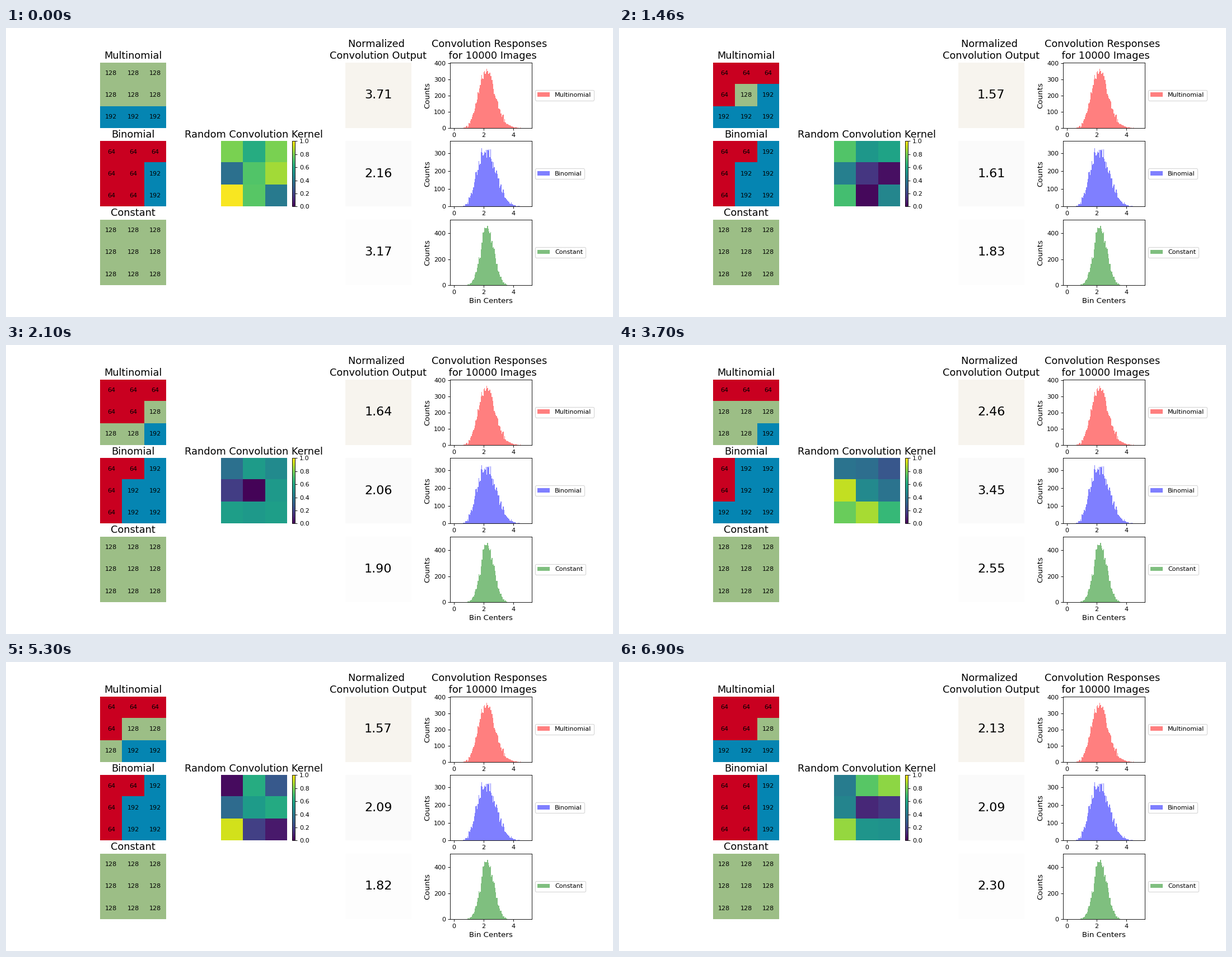
Animation, 1084 px wide and 517 px high, one loop 8000 ms. Source, as a matplotlib script:

```python
import numpy as np
import matplotlib.pyplot as plt
from matplotlib.animation import FuncAnimation
from matplotlib.colors import ListedColormap

W, H, DPI = 1084, 517, 80
GRID_H = 517.5                     # layout height behind the three rows
SIDE = GRID_H * 0.77 / 3.4         # panel side in pixels
NAMES = ["Multinomial", "Binomial", "Constant"]
LEVELS = np.array([64, 128, 192])
PIXEL_CMAP = ListedColormap(["#c90020", "#9cbe86", "#0585b2"])

# Per step: multinomial counts of 64 and 128, binomial count of 64, kernel
STEPS = [
    (0, 6, 7, [.80, .62, .80, .37, .73, .86, .99, .74, .41]),
    (4, 1, 4, [.73, .53, .58, .43, .16, .04, .70, .02, .46]),
    (5, 3, 4, [.37, .55, .48, .18, .01, .54, .56, .54, .56]),
    (3, 5, 2, [.38, .36, .27, .91, .47, .38, .77, .87, .67]),
    (4, 3, 4, [.03, .62, .28, .35, .55, .61, .93, .19, .07]),
    (5, 1, 6, [.42, .74, .83, .45, .11, .16, .84, .52, .51]),
]

fig = plt.figure(figsize=(W / DPI, H / DPI), dpi=DPI, facecolor="white")


def panel(x, row, width=SIDE):
    """Axes with the left edge at pixel x, in the given row."""
    bottom = GRID_H * 0.11 + (2 - row) * 1.2 * SIDE
    return fig.add_axes([x / W, bottom / H, width / W, SIDE / H])


def picture(x, row, data, **style):
    """Image without axes."""
    ax = panel(x, row)
    ax.axis("off")
    return ax, ax.imshow(data, interpolation="nearest", **style)


def title(ax, text):
    ax.set_title(text, fontsize=16)


def sorted_pixels(step):
    """Level index of each pixel for the three kinds of image."""
    low, mid, binom_low, _ = STEPS[step]
    return [np.repeat([0, 1, 2], [low, mid, 9 - low - mid]),
            np.repeat([0, 2], [binom_low, 9 - binom_low]),
            np.ones(9, int)]


# Input images
images, cell_texts = [], []
for row, name in enumerate(NAMES):
    ax, image = picture(168.4, row, np.ones((3, 3)),
                        cmap=PIXEL_CMAP, vmin=0, vmax=2)
    title(ax, name)
    images.append(image)
    cell_texts.append([ax.text(i % 3, i // 3, "", ha="center", va="center")
                       for i in range(9)])

# Kernel and its colour bar
ax, kernel_image = picture(384.2, 1, np.zeros((3, 3)),
                           cmap="viridis", vmin=0, vmax=1)
title(ax, "Random Convolution Kernel")
fig.colorbar(kernel_image, cax=panel(510.6, 1, SIDE / 20),
             ticks=np.linspace(0, 1, 6))

# Convolution outputs
out_texts = []
for row, rgb in enumerate([(247, 244, 238), (250, 250, 250), (253, 253, 253)]):
    ax, _ = picture(606.2, row, np.full((1, 1, 3), rgb, dtype=np.uint8))
    out_texts.append(ax.text(0, 0, "", fontsize=20, ha="center", va="center"))
    if row == 0:
        title(ax, "Normalized \nConvolution Output")

# Histograms of kernel responses over random images
rng = np.random.default_rng(1)
shape = (10000, 9)
weights = rng.random(shape)
samples = [rng.choice(LEVELS, shape), rng.choice(LEVELS[::2], shape),
           np.full(shape, LEVELS[1])]
styles = [("red", 406, 100), ("blue", 367, 100), ("green", 506, 200)]
for row, (color, top, tick) in enumerate(styles):
    ax = panel(793.05, row, 146.1)
    response = (weights * samples[row]).sum(axis=1) / 255
    ax.hist(response, bins=np.linspace(0, 5, 101), histtype="stepfilled",
            color=color, alpha=0.5, lw=0, label=NAMES[row])
    ax.set_xlim(-0.25, 5.25)
    ax.set_ylim(0, top)
    ax.set_xticks([0, 2, 4])
    ax.set_yticks(range(0, top, tick))
    ax.set_ylabel("Counts", fontsize=12)
    ax.legend(loc="center left", bbox_to_anchor=(1, 0.5))
    if row == 0:
        title(ax, "Convolution Responses \n for 10000 Images")
ax.set_xlabel("Bin Centers", fontsize=12)


def update(frame):
    step = (frame * 100 + 1100) // 1600
    kernel = np.array(STEPS[step][-1])
    kernel_image.set_data(kernel.reshape(3, 3))
    for row, pixels in enumerate(sorted_pixels(step)):
        response = kernel @ LEVELS[pixels] / 255
        out_texts[row].set_text(f"{response:.2f}")
        # The binomial image fills column by column
        grid = pixels.reshape(3, 3, order="F" if row == 1 else "C")
        images[row].set_data(grid)
        for text, level in zip(cell_texts[row], grid.flat):
            text.set_text(str(LEVELS[level]))
    return []


anim = FuncAnimation(fig, update, frames=80, interval=100,
                     repeat=True, repeat_delay=0)
plt.show()
```
